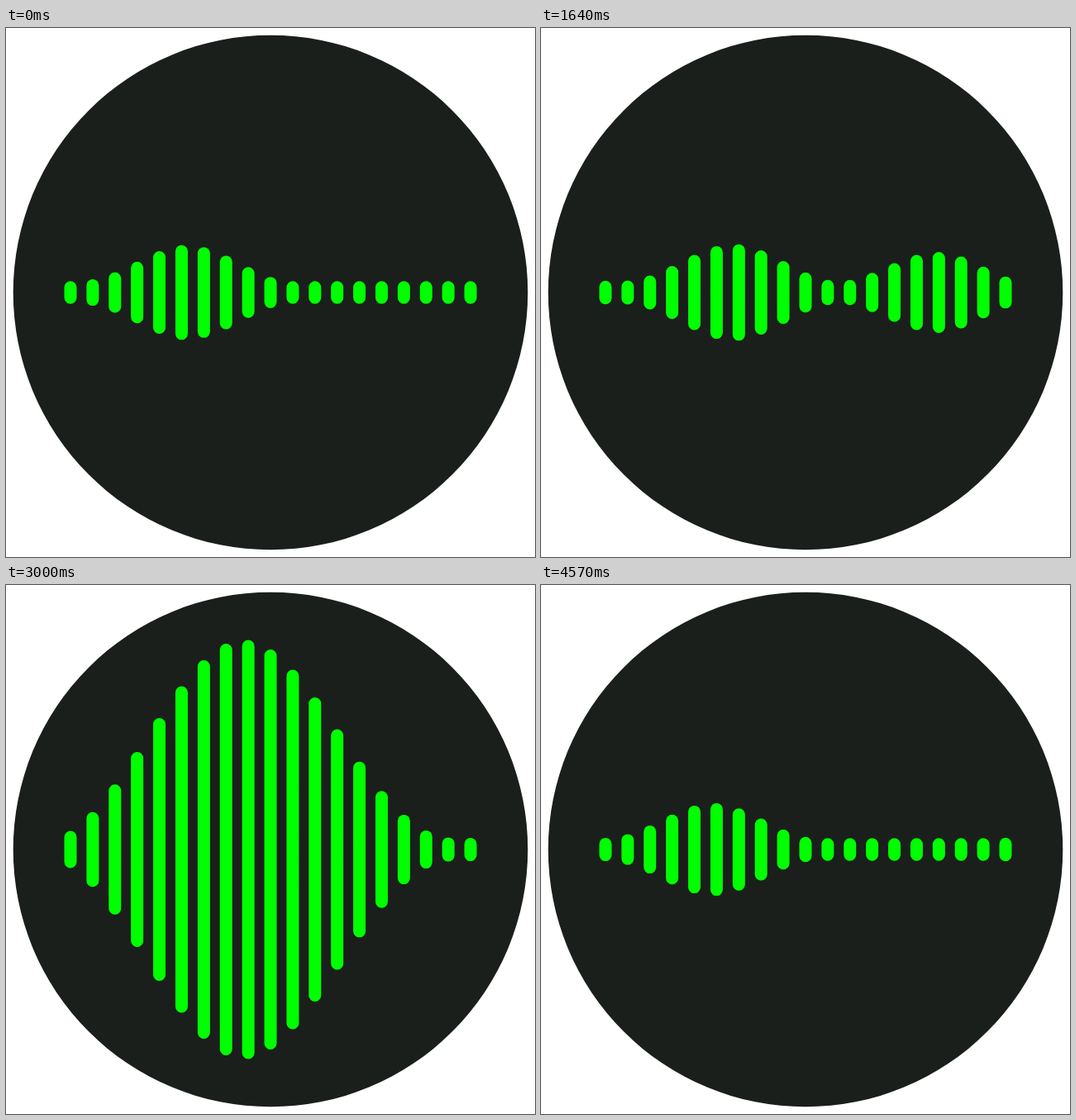
An HTML page with a canvas for the animation above (4.64 s loop, 640 by 640 pixels).

```html
<!DOCTYPE html>
<html lang="en">
<head>
<meta charset="utf-8">
<title>Sound wave</title>
<style>
  html, body { margin: 0; height: 100%; overflow: hidden; background: #fff; }
  canvas { display: block; }
</style>
</head>
<body>
<canvas id="stage" width="640" height="640"></canvas>
<script>
const ctx = document.getElementById('stage').getContext('2d');
const LOOP = 4640, BARS = 19, PERIOD = 58;
const REST = 13.8, BIG = 243, SMALL = BIG / 5;
const WIDTH = 15, GAP = 484 / 18;

// Smooth rise and fall around a centre.
function pulse(x, centre, half) {
  const u = Math.max(0, 1 - Math.abs(x - centre) / half);
  return u * u * (3 - 2 * u);
}

// Travelling signal: two small pulses, one big, a pause, one small.
function signal(x) {
  x = (x + PERIOD) % PERIOD;
  return SMALL * (pulse(x, 5, 5) + pulse(x, 15, 5) + pulse(x, 53, 5)) + BIG * pulse(x, 30, 10);
}

// Elliptical falloff towards both ends of the row.
function envelope(i) {
  const d = Math.min(Math.abs(i - 9), 8.76) / 9;
  return Math.sqrt(1 - d * d);
}

// The wave advances half a bar every 40 ms, shown at 14 pictures per second.
function travel(ms) {
  const shown = Math.floor((Math.floor(ms / 10) * 10 + 5) * 14 / 1000);
  return Math.floor((shown + 0.5) * 25 / 14) / 2;
}

function draw(ms) {
  const shift = travel(ms);
  ctx.clearRect(0, 0, 640, 640);
  ctx.fillStyle = '#1a1f1b';
  ctx.beginPath();
  ctx.arc(320, 320, 311.3, 0, 2 * Math.PI);
  ctx.fill();

  ctx.strokeStyle = '#00ff00';
  ctx.lineWidth = WIDTH;
  ctx.lineCap = 'round';
  ctx.beginPath();
  for (let i = 0; i < BARS; i++) {
    const x = 78 + i * GAP;
    const reach = REST + envelope(i) * signal(shift - i) - WIDTH / 2;
    ctx.moveTo(x, 320 - reach);
    ctx.lineTo(x, 320 + reach);
  }
  ctx.stroke();
}

const start = performance.now();
function tick() {
  draw((performance.now() - start) % LOOP);
  requestAnimationFrame(tick);
}
tick();
</script>
</body>
</html>
```
